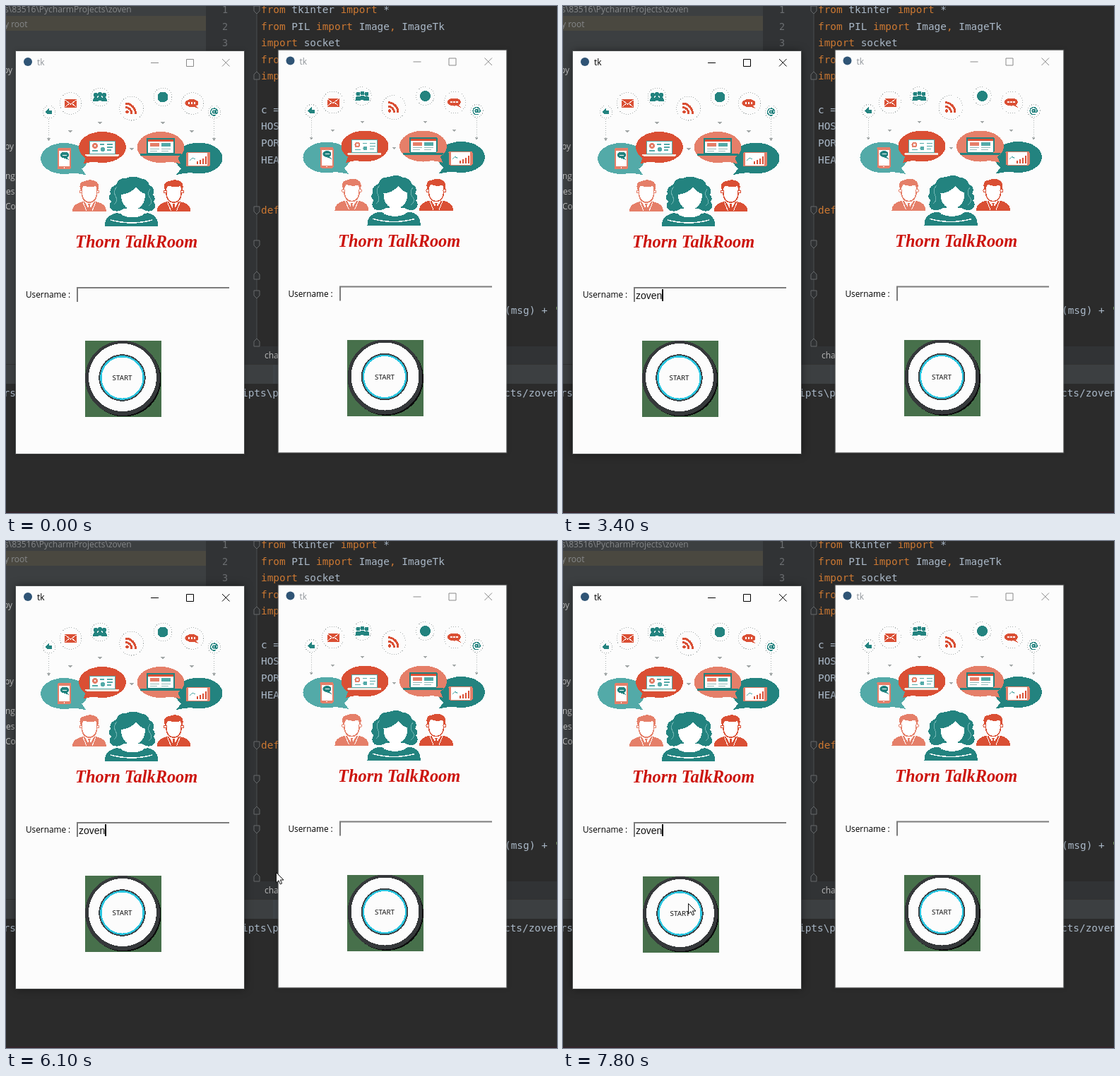
Animation, 780 px wide and 718 px high, one loop 8000 ms. Source, as an HTML page:

```html
<!DOCTYPE html>
<html lang="en">
<head>
<meta charset="utf-8">
<title>Chat login</title>
<style>
  html, body { margin: 0; width: 100%; height: 100%; overflow: hidden; background: #2b2b2b; }
  svg { display: block; width: 780px; height: 718px; }
  .mono { font: 14.4px "DejaVu Sans Mono", monospace; fill: #a9b7c6; }
  .ui { font: 12px "Open Sans", sans-serif; fill: #bbbbbb; }
  .dim { fill: #86888a; }
  .num { fill: #6b6e71; font-size: 13.5px; }
  .kw { fill: #cc7832; }
  .fold { fill: #2f3133; stroke: #66696b; }
  .frame { fill: #fcfcfc; filter: drop-shadow(0 0 3px rgba(0,0,0,.28)); }
  .controls { fill: none; stroke: #8a8a8a; }
  .name { fill: #8f9499; }
  .active .frame { filter: drop-shadow(0 0 6px rgba(0,0,0,.5)); }
  .active .controls { stroke: #000; }
  .active .name { fill: #000; }
  .art, .button { shape-rendering: crispEdges; }
  .dots { fill: none; stroke: #aab0b0; stroke-dasharray: 1 2.2; }
  .brand { font: italic bold 24.4px "Liberation Serif", serif; fill: #cc130c; }
  .label { font: 11.8px "Open Sans", sans-serif; fill: #000; }
  .typed { font: 14px "Liberation Sans", sans-serif; fill: #111; }
  .start { font: 9.8px "Noto Sans", sans-serif; fill: #111; }
</style>
</head>
<body>
<svg viewBox="0 0 780 718">
  <rect width="780" height="718" fill="#2b2b2b"/>
  <rect width="283" height="507" fill="#3c3f41"/>
  <rect y="14" width="283" height="21" fill="#4a4840"/>
  <rect x="283" width="72" height="482" fill="#313335"/>
  <rect x="283" y="482" width="497" height="25" fill="#313335"/>
  <rect y="507" width="780" height="28" fill="#3c3f41"/>
  <rect y="507" width="780" height="1" fill="#323232"/>
  <rect x="378" y="508" width="330" height="27" fill="#3f4448"/>
  <rect y="716" width="780" height="2" fill="#33252a"/>
  <g class="ui">
    <text class="dim" x="-2" y="9">s\83516\PycharmProjects\zoven</text>
    <text class="dim" x="-2" y="30">y root</text>
    <text x="-4" y="95">py</text><text x="-2" y="203">by</text>
    <text x="-1" y="245">ng</text><text x="-3" y="267">ies</text>
    <text x="-1" y="288">Co</text><text x="366" y="499">cha</text>
  </g>
  <g class="mono">
    <text class="num" x="306" y="10">1</text><text class="num" x="306" y="34">2</text><text class="num" x="306" y="57">3</text>
    <text x="361" y="10"><tspan class="kw">from</tspan> tkinter <tspan class="kw">import</tspan> *</text>
    <text x="361" y="34"><tspan class="kw">from</tspan> PIL <tspan class="kw">import</tspan> Image<tspan class="kw">,</tspan> ImageTk</text>
    <text x="361" y="57"><tspan class="kw">import</tspan> socket</text>
    <text class="kw" x="361" y="81">from</text>
    <text class="kw" x="361" y="104">import</text>
    <text x="361" y="152">c =</text><text x="361" y="175">HOST</text>
    <text x="361" y="199">PORT</text><text x="361" y="223">HEAD</text>
    <text class="kw" x="361" y="294">def</text>
    <text x="706" y="436">(msg) + <tspan fill="#6a8759">'</tspan></text>
    <text x="-3.5" y="553">rs</text><text x="334" y="553">ipts\p</text><text x="705" y="553">cts/zoven</text>
  </g>
  <g id="folds"></g>
  <g id="windows"></g>
  <path id="cursor" d="M.5 .5V15L4 11.8 6.3 17 8.6 16 6.4 11H11Z" fill="#fff" stroke="#111"/>
</svg>
<script>
const LOOP = 8000;
const TEAL = '#23837f', AQUA = '#53aaa8', RED = '#da4f34', SALMON = '#e57f69';
const $ = id => document.getElementById(id);

const ellipse = (x, y, rx, ry, fill, more = '') =>
  `<ellipse cx="${x}" cy="${y}" rx="${rx}" ry="${ry}" fill="${fill}" ${more}/>`;
const circle = (x, y, r, fill, more) => ellipse(x, y, r, r, fill, more);
const rect = (x, y, w, h, fill, more = '') =>
  `<rect x="${x}" y="${y}" width="${w}" height="${h}" fill="${fill}" ${more}/>`;
const path = (d, fill, more = '') => `<path d="${d}" fill="${fill}" ${more}/>`;
const line = (d, stroke, width = 1) => path(d, 'none', `stroke="${stroke}" stroke-width="${width}"`);
const tip = (x, y) => path(`M${x - 3} ${y - 2}h6l-3 4z`, '#a3a8a8');

const bubble = (x, y, fill, dir, reach) => ellipse(x, y, 33.5, 22, fill) +
  path(`M${x + dir * 6} ${y + 20}Q${x + dir * 20} ${y + 21} ${x + dir * reach} ${y + 23.5}L${x + dir * 23} ${y + 12}z`, fill);

function icons() {
  const rings = [[61, 150, 9], [91.5, 138, 15.5], [133, 129, 13], [177.5, 145, 17], [222, 129, 13], [264, 138, 15.5], [295, 150, 9]];
  return rings.map(([x, y, r]) => `<circle class="dots" cx="${x}" cy="${y}" r="${r}"/>`).join('') +
    '<path class="dots" d="M60.5 160V187M294.5 160V187"/>' +
    [[60.5, 189], [91, 178], [133, 166], [178, 203], [222, 166], [263, 178], [294.5, 189]].map(p => tip(...p)).join('') +
    path('M55 150L61 144V148H65V153H58Z', TEAL) +
    rect(83, 132, 17, 12, RED) + line('M83.5 133L91.5 139 99.5 133M84 143L89 138.5M99 143L94 138.5', '#fff') +
    [[127, 126], [139, 126], [133, 125]].map(([x, y]) => circle(x, y, 3, TEAL) + path(`M${x - 4} ${y + 9}q0-6 4-6t4 6z`, TEAL)).join('') +
    circle(171.5, 150, 2.4, RED) + line('M169 143.5A9 9 0 0 1 178 152.5M169 138A14.5 14.5 0 0 1 183.5 152.5', RED, 3) +
    circle(222, 129, 7.5, TEAL) +
    ellipse(263, 137.5, 9.5, 5.5, RED) + path('M268 141L272 145 265 142Z', RED) +
    [259, 263, 267].map(x => circle(x, 137.5, 1.2, '#fff')).join('') +
    circle(294.5, 150, 1.8, 'none', `stroke="${TEAL}" stroke-width="1.5"`) +
    line('M297 147V152Q300 153 299.5 149A5 5 0 1 0 297 154.5', TEAL, 1.4);
}

function bubbles() {
  const bars = [[270, 4], [274, 6], [278, 8], [282, 11]];
  return bubble(82.5, 216, AQUA, 1, 31) + bubble(273, 215.5, TEAL, -1, 32) +
    bubble(136.5, 200, RED, -1, 27) + bubble(219, 200, SALMON, 1, 28) +
    rect(73, 201, 19, 30, SALMON, 'rx="2"') + rect(75, 205, 15, 22, '#fff') +
    ellipse(83, 211, 6, 4.5, TEAL) + path('M85 214L89 218 81 215Z', TEAL) + line('M80 211H86', '#fff') + circle(82.5, 229, 1, '#fff') +
    rect(118, 191, 36, 18, '#fff', `stroke="${AQUA}"`) + rect(112, 209.5, 48, 3, '#f4e7df', 'rx="1.5"') +
    circle(126, 198, 4, SALMON) + circle(126, 198, 1.6, '#fff') + circle(137, 203, 3, AQUA) +
    line('M133 196H139M143 196H151M143 200H151M143 204H149M122 205H130', AQUA, 1.3) +
    rect(199, 187, 40, 22, TEAL, 'rx="1.5"') + rect(201, 189, 36, 19, '#fff') + rect(201, 189, 36, 3, RED) +
    rect(204, 194, 13, 5, SALMON) + rect(220, 194, 13, 5, AQUA) + line('M204 202H217M220 202H233M204 205H214M220 205H230', '#8fb9b7') +
    rect(190, 209, 58, 3, TEAL, 'rx="1.5"') +
    rect(255, 207, 34, 20, SALMON, 'rx="2"') + rect(258, 208, 27, 18, '#fff') +
    bars.map(([x, h]) => rect(x, 224 - h, 2, h, RED)).join('') + line('M260 219L264 215 268 217', AQUA);
}

const man = (x, color) =>
  path(`M${x - 24} 291Q${x - 24} 280 ${x - 9} 277H${x + 9}Q${x + 24} 280 ${x + 24} 291Z`, color) +
  path(`M${x - 8} 275L${x} 289 ${x + 8} 275Z`, '#fff') +
  path(`M${x - 2} 280h4l-1 3 2 7h-6l2-7z`, color) +
  line(`M${x - 9} 278L${x - 4} 290M${x + 9} 278L${x + 4} 290`, '#fff') +
  path(`M${x - 11} 260Q${x - 11} 278 ${x} 278T${x + 11} 260V254H${x - 11}Z`, '#fff', `stroke="${color}" stroke-width="1.6"`) +
  circle(x - 12, 263, 2, '#fff', `stroke="${color}"`) + circle(x + 12, 263, 2, '#fff', `stroke="${color}"`) +
  path(`M${x - 12} 262Q${x - 17} 249 ${x - 6} 248Q${x + 3} 244 ${x + 10} 249Q${x + 15} 253 ${x + 12} 262L${x + 9} 255Q${x} 258 ${x - 8} 254Z`, color);

const woman = () =>
  path('M156 253Q159 243 170 244Q181 239 190 244Q201 245 203 254Q212 258 208 267Q213 272 209 277Q214 284 208 289Q201 293 192 287H167Q158 293 150 289Q144 283 149 277Q143 272 148 266Q145 258 156 253Z', TEAL) +
  path('M140 312Q139 297 157 293Q179 299 201 293Q216 297 215 312Z', TEAL) +
  line('M148 303Q178 311 207 303', '#fff', 1.5) +
  path('M171 281V291Q160 293 164 296Q179 303 194 296Q198 293 187 291V281Z', '#fff') +
  path('M163 267Q176 266 184 256Q188 263 197 266Q197 286 179.5 289Q163 286 163 267Z', '#fff') +
  line('M157 256Q151 262 155 269T153 281M204 259Q199 266 204 272T202 283', '#6fb4b1');

const button = () => `<g class="button">` + rect(111.5, 474, 108, 108, '#47704b') +
  circle(167, 529, 52.5, '#0c0d0d') + circle(165, 527, 53, '#35383a') + circle(165, 526, 48, '#fcfcfc') +
  circle(164.5, 526.5, 33.3, '#3a4347') + circle(164.5, 526.5, 31.4, '#27c5e0') + circle(164.5, 526.5, 29, '#fcfcfc') +
  '<text class="start" x="164.5" y="530" text-anchor="middle">START</text></g>';

const makeWindow = (dx, dy, shift) => `<g transform="translate(${dx} ${dy})">
  <rect class="frame" x="14" y="64" width="323" height="570"/>
  <rect x="13.5" y="63.5" width="324" height="571" fill="none" stroke="#5c5f60" stroke-opacity=".6"/>
  ${circle(31, 79, 6, '#2f5475')}
  <text class="ui name" x="44" y="84">tk</text>
  <path class="controls" d="M205 80.5H216M255.5 75.5H265.5V85.5H255.5ZM306 75L316.5 85.5M316.5 75L306 85.5"/>
  <g class="art">${icons()}${bubbles()}${man(118, SALMON)}${man(237.5, RED)}${woman()}</g>
  <text class="label" x="28" y="413">Username :</text>
  <g transform="translate(${shift} 0)">
    <text class="brand" x="98" y="342">Thorn TalkRoom</text>
    <path d="M101 419V399H316" fill="none" stroke="#7c7c7c" stroke-width="2"/>
    <text class="typed" x="103" y="415"></text>
    <rect class="caret" y="401" width="2" height="17"/>
  </g>
  ${button()}</g>`;

const foldMark = (y, dir) => `<path class="fold" d="M351 ${y - dir * 5}h8v${dir * 7}l-4 ${dir * 4}l-4 ${-dir * 4}z"/>`;
$('folds').innerHTML = line('M355 0V482', '#4b4e50') +
  [[5, 1], [99, -1], [289, 1], [337, 1], [382, -1], [408, 1], [477, -1]].map(f => foldMark(...f)).join('');
$('windows').innerHTML = makeWindow(0, 0, 0) + makeWindow(371.5, -1.5, .5);

const [left, right] = $('windows').children;
const part = (win, name) => win.querySelector('.' + name);
const typed = part(left, 'typed'), leftCaret = part(left, 'caret'), rightCaret = part(right, 'caret');
const press = part(left, 'button'), cursor = $('cursor');

// Each step is [start, value...] and holds until the next one.
const text = [[0, ''], [2100, 'z'], [2200, 'zo'], [2300, 'zov'], [2500, 'zoven'], [2700, 'zovenc'],
  [3400, 'zoven'], [3600, 'zove'], [4000, 'zoven']];
const focus = [[0, null], [1300, left], [6800, right], [7700, left]];
const blink = [[0, 0], [1300, 1], [1800, 0], [2100, 1], [3000, 0], [3400, 1], [3900, 0], [4000, 1], [4400, 0],
  [4800, 1], [5400, 0], [5700, 1], [6300, 0], [6500, 1], [7400, 0], [7700, 1]];
const pointer = [[0], [300, 74, 121], [400, 201, 481], [700, 197, 466], [800, 192, 446], [900, 188, 429], [1000],
  [4700, 218, 425], [4800, 222, 448], [4900, 216, 478], [5000, 209, 499], [5100, 204, 507],
  [6000, 298, 489], [6100, 382, 469], [6200, 438, 450], [6300, 470, 434], [6400, 482, 424], [6500],
  [7200, 464, 420], [7300, 370, 458], [7400, 240, 500], [7500, 177, 513]];

const at = (steps, t) => steps.findLast(s => s[0] <= t);
const show = (el, on) => el.setAttribute('visibility', on ? 'visible' : 'hidden');

function draw(t) {
  const win = at(focus, t)[1], on = at(blink, t)[1], [, x, y] = at(pointer, t);
  const word = at(text, t)[1];
  if (typed.textContent !== word) typed.textContent = word;
  for (const w of [left, right]) w.classList.toggle('active', w === win);
  leftCaret.setAttribute('x', word ? Math.round(102.5 + typed.getComputedTextLength()) : 102);
  rightCaret.setAttribute('x', 102);
  show(leftCaret, on && win === left);
  show(rightCaret, on && win === right);
  press.setAttribute('transform', t >= 7800 ? 'translate(1 1)' : '');
  show(cursor, x !== undefined);
  if (x !== undefined) cursor.setAttribute('transform', `translate(${x} ${y})`);
}

function tick() {
  draw(performance.now() % LOOP);
  requestAnimationFrame(tick);
}
tick();
</script>
</body>
</html>
```
